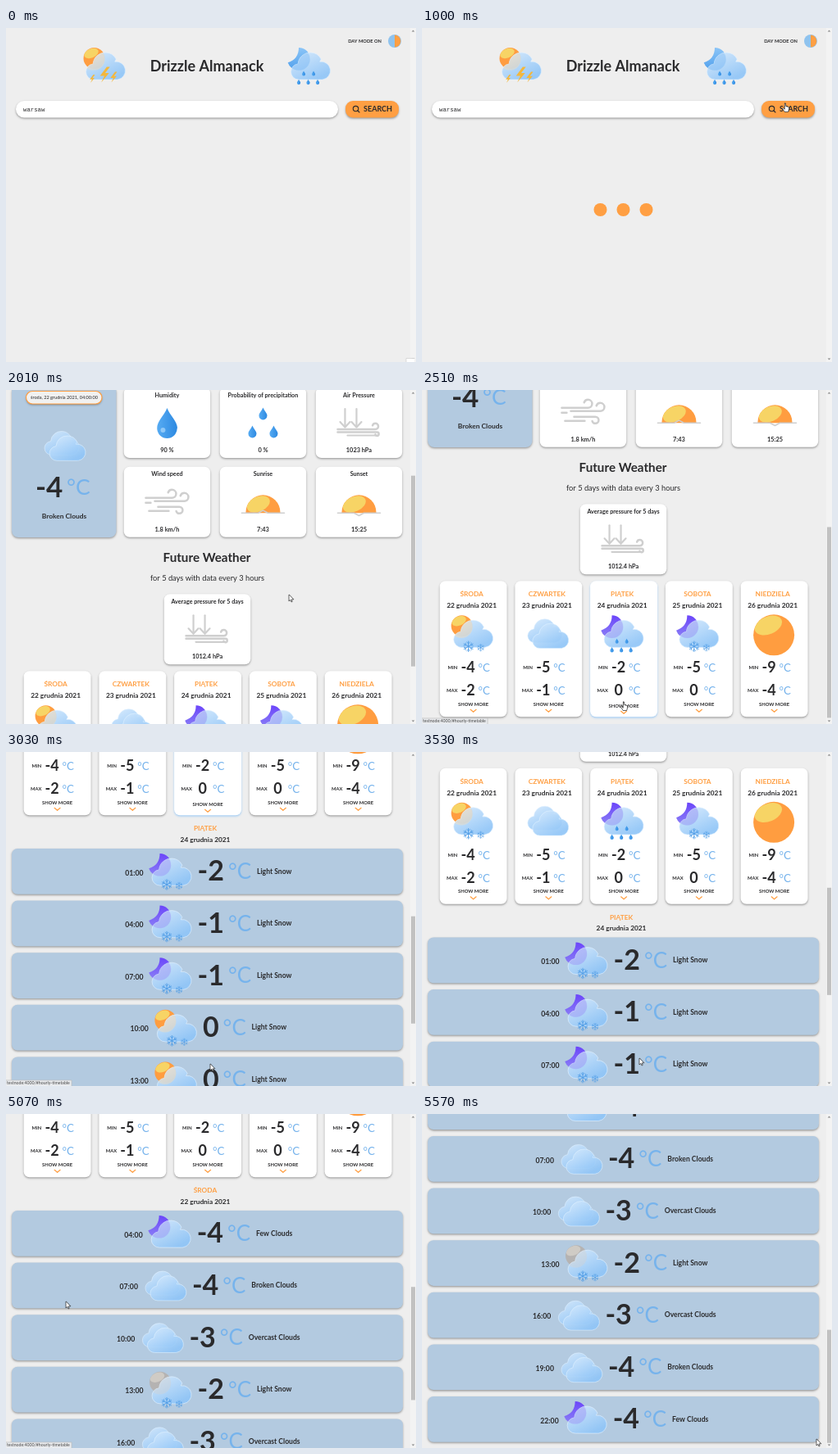
Recreate the animation shown at these times as an HTML page with a canvas. Size 500x408 px, loop 6.08 s.

```html
<!DOCTYPE html>
<html lang="en">
<head>
<meta charset="utf-8">
<title>Drizzle Almanack</title>
<style>
  html, body { margin: 0; width: 100%; height: 100%; overflow: hidden; background: #eee; }
  canvas { display: block; width: 500px; height: 408px; }
</style>
</head>
<body>
<canvas id="stage"></canvas>
<script>
const W = 500, H = 408, LOOP = 6080;
const INK = '#2a2a2c', ORANGE = '#ff9f43', BLUE = '#76b3ec', PANEL = '#b3cae0', GREY = '#cfcfcf';
const SANS = 'Lato, "Open Sans", sans-serif', MONO = '"Liberation Mono", monospace';
const ROWS_TOP = 721, ROW_STEP = 63.6;

const canvas = document.getElementById('stage');
const c = canvas.getContext('2d');
const dpr = window.devicePixelRatio || 1;
canvas.width = W * dpr;
canvas.height = H * dpr;

const days = [
  ['ŚRODA', 22, 'sun snow', -4, -2],
  ['CZWARTEK', 23, 'cloud', -5, -1],
  ['PIĄTEK', 24, 'moon rain', -2, 0],
  ['SOBOTA', 25, 'moon snow', -5, 0],
  ['NIEDZIELA', 26, 'clear', -9, -4]
];

const hours = {
  0: [
    ['04:00', -4, 'Few Clouds', 'moon'],
    ['07:00', -4, 'Broken Clouds', 'cloud'],
    ['10:00', -3, 'Overcast Clouds', 'cloud'],
    ['13:00', -2, 'Light Snow', 'dim snow'],
    ['16:00', -3, 'Overcast Clouds', 'cloud'],
    ['19:00', -4, 'Broken Clouds', 'cloud'],
    ['22:00', -4, 'Few Clouds', 'moon']
  ],
  2: [-2, -1, -1, 0, 0, -1, -1, -2].map((deg, i) => [
    String(1 + 3 * i).padStart(2, '0') + ':00', deg, 'Light Snow',
    (i > 2 && i < 5 ? 'sun' : 'moon') + ' snow'
  ])
};

const scenes = [
  { at: 0, corner: true },
  { at: 500, hand: [442, 92] },
  { at: 1000, hand: [442, 92], dots: true },
  { at: 1510, loaded: true, hand: [442, 92] },
  { at: 2010, loaded: true, scroll: 171, arrow: [345, 250] },
  { at: 2510, loaded: true, scroll: 281, hand: [245, 381], hover: 2, status: 1 },
  { at: 3030, loaded: true, scroll: 603, day: 2, arrow: [249, 381], hover: 2, status: 1 },
  { at: 3530, loaded: true, scroll: 494.5, day: 2, arrow: [265, 374] },
  { at: 4060, loaded: true, scroll: 437.5, day: 2, arrow: [265, 374] },
  { at: 4560, loaded: true, scroll: 437.5, day: 2, hand: [73.3, 229.5], click: true, hover: 0, status: .4 },
  { at: 5070, loaded: true, scroll: 603, day: 0, arrow: [73, 229], status: 1 },
  { at: 5570, loaded: true, scroll: 757.6, day: 0, arrow: [481, 397] }
];

function text(s, x, y, size, { color = INK, weight = 700, align = 'center', font = SANS } = {}) {
  c.font = `${weight} ${size}px ${font}`;
  c.fillStyle = color;
  c.textAlign = align;
  c.fillText(s, x, y);
}

function textWidth(s, size) {
  c.font = `700 ${size}px ${SANS}`;
  return c.measureText(s).width;
}

function box(x, y, w, h, r, fill, shadow = 'rgba(0,0,0,.36)') {
  c.save();
  c.shadowColor = shadow;
  c.shadowBlur = 2.5 * dpr;
  c.shadowOffsetY = 1.3 * dpr;
  c.beginPath();
  c.roundRect(x, y, w, h, r);
  c.fillStyle = fill;
  c.fill();
  c.restore();
}

function disc(x, y, r, fill) {
  c.beginPath();
  c.arc(x, y, r, 0, 7);
  c.fillStyle = fill;
  c.fill();
}

function line(points, color, width) {
  c.beginPath();
  points.forEach(([x, y]) => c.lineTo(x, y));
  c.strokeStyle = color;
  c.lineWidth = width;
  c.lineCap = c.lineJoin = 'round';
  c.stroke();
}

function blend(x0, y0, x1, y1, from, to) {
  const g = c.createLinearGradient(x0, y0, x1, y1);
  g.addColorStop(0, from);
  g.addColorStop(1, to);
  return g;
}

function at(x, y, k, draw) {
  c.save();
  c.translate(x, y);
  c.scale(k, k);
  draw();
  c.restore();
}

function sun(x, y, r, main = '#ff9d40', light = '#f7d465') {
  c.save();
  disc(x, y, r, main);
  c.clip();
  c.beginPath();
  c.ellipse(x - r * .27, y - r * .47, r * .7, r * .43, -.4, 0, 7);
  c.fillStyle = light;
  c.fill();
  c.restore();
}

function moon(x, y, r, from, to) {
  c.beginPath();
  c.arc(x, y, r, -Math.PI / 2, Math.PI * .9);
  c.quadraticCurveTo(x, y, x, y - r);
  c.fillStyle = blend(x, y - r, x, y + r, from, to);
  c.fill();
}

// Glassy cloud; glow tints the part lying over the sun or moon
function cloud(x, y, w, glow) {
  at(x, y, w, () => {
    c.beginPath();
    c.arc(.2, .5, .2, Math.PI / 2, Math.PI * 1.45);
    c.arc(.49, .32, .31, Math.PI * 1.02, Math.PI * 1.85);
    c.arc(.77, .47, .23, Math.PI * 1.45, Math.PI / 2);
    c.closePath();
    c.globalAlpha = .92;
    c.fillStyle = blend(.25, 0, .6, .7, '#cfe6fc', '#90c5f7');
    c.fill();
    c.strokeStyle = 'rgba(225,241,255,.8)';
    c.lineWidth = .018;
    c.stroke();
    if (!glow) return;
    c.clip();
    c.globalAlpha = .38;
    disc(.2, .18, .28, glow);
  });
}

function drop(x, y, h) {
  at(x, y, h, () => {
    c.beginPath();
    c.moveTo(0, -.5);
    c.bezierCurveTo(.1, -.25, .34, -.05, .34, .17);
    c.arc(0, .17, .33, 0, Math.PI);
    c.bezierCurveTo(-.34, -.05, -.1, -.25, 0, -.5);
    c.fillStyle = blend(-.3, 0, .3, 0, '#55aaf2', '#2f8be2');
    c.fill();
  });
}

function flake(x, y, r) {
  for (let i = 0; i < 6; i++) {
    const a = i * Math.PI / 3 + Math.PI / 6;
    const p = (d, off) => [x + Math.cos(a + off) * d, y + Math.sin(a + off) * d];
    line([[x, y], p(r, 0)], '#509de6', r * .15);
    line([p(r * .9, .35), p(r * .55, 0), p(r * .9, -.35)], '#509de6', r * .13);
  }
}

function bolt(x, y, h) {
  at(x, y, h, () => {
    c.beginPath();
    [[.15, -.5], [-.28, .08], [0, .08], [-.2, .5], [.3, -.1], [.05, -.1], [.35, -.5]].forEach(p => c.lineTo(...p));
    c.fillStyle = '#f4b73c';
    c.fill();
  });
}

// Weather icon in a 54 x 46 cell
function icon(kind, x, y) {
  const has = k => kind.includes(k);
  at(x, y, 1, () => {
    if (kind === 'clear') return sun(28, 24, 25);
    if (kind === 'cloud') {
      cloud(3, 4, 42);
      cloud(9, 9.5, 44);
      return;
    }
    let glow;
    if (has('sun')) {
      sun(14.5, 13, 13);
      glow = '#ffdcae';
    }
    if (has('dim')) {
      sun(14.5, 13, 13, '#b5b3b2', '#cfcbc5');
      glow = '#d5d2d0';
    }
    if (has('moon')) {
      moon(14, 14, 14, '#6b45fa', '#8c82f5');
      glow = '#9a8df2';
    }
    if (has('dusk')) {
      moon(14, 14, 14, '#8cc5f7', '#4f9fec');
      glow = '#7db8f2';
    }
    cloud(4.5, 5.5, 48, glow);
    if (has('snow')) {
      flake(22.5, 38, 6.3);
      flake(37.5, 39.5, 4.2);
    }
    if (has('rain')) {
      for (let i = 0; i < 3; i++) {
        drop(14 + 11.5 * i, 42, 6.5);
        if (i < 2) drop(20 + 12 * i, 31.5, 6);
      }
    }
    if (has('bolt')) {
      bolt(27, 33, 19);
      bolt(12, 38, 10);
      bolt(38, 36, 13);
    }
  });
}

function hook(x0, x1, y, r, up) {
  c.beginPath();
  c.moveTo(x0, y);
  c.lineTo(x1, y);
  if (up) c.arc(x1, y - r, r, Math.PI / 2, -Math.PI * .9, true);
  else c.arc(x1, y + r, r, -Math.PI / 2, Math.PI * .9);
  c.strokeStyle = GREY;
  c.lineWidth = 2.5;
  c.lineCap = 'round';
  c.stroke();
}

const art = {
  humidity(x, y) {
    drop(x, y + 43.5, 37);
    disc(x - 5, y + 52, 3, 'rgba(190,226,255,.6)');
  },
  rain(x, y) {
    drop(x, y + 32, 15);
    drop(x - 13, y + 54, 15);
    drop(x + 13, y + 54, 15);
  },
  pressure(x, y) {
    for (const dx of [-17, -3]) {
      line([[x + dx, y + 26], [x + dx, y + 48]], GREY, 2.2);
      line([[x + dx - 6, y + 42], [x + dx, y + 48.5], [x + dx + 6, y + 42]], GREY, 2.2);
    }
    hook(x - 26, x + 20, y + 51, 3.6, true);
    hook(x - 26, x + 22, y + 54.5, 2.2, false);
    line([[x - 14, y + 58.5], [x + 22, y + 58.5]], GREY, 2.2);
  },
  wind(x, y) {
    hook(x - 26, x + 6, y + 38, 5, true);
    hook(x - 15, x + 21, y + 42, 5, true);
    line([[x - 26, y + 44], [x - 20, y + 44]], GREY, 2.5);
    hook(x - 11, x + 15, y + 49, 4, false);
    line([[x - 22, y + 54], [x + 2, y + 54]], GREY, 2.5);
  },
  horizon(x, y, dir) {
    const h = y + 56.5;
    c.save();
    c.beginPath();
    c.rect(x - 30, y + 20, 60, 36.5);
    c.clip();
    sun(x, h - 1, 21);
    c.restore();
    line([[x - 26, h], [x - 6, h], [x, h + dir * 3.2], [x + 6, h], [x + 26, h]], GREY, 1.6);
  }
};

function stat(x, y, label, value, draw, dir) {
  const w = 105.5, mid = x + w / 2;
  box(x, y, w, 86, 7, '#fff');
  text(label, mid, y + 11.5, 7.2);
  draw(mid, y, dir);
  text(value, mid, y + 79, 7.4);
}

function header() {
  icon('sun bolt', 93, 24);
  icon('dusk rain', 343, 24);
  text('Drizzle Almanack', 245, 53, 18);
  text('DAY MODE ON', 437.5, 18, 5.7);
  disc(474, 16, 8, '#8fc3ee');
  c.beginPath();
  c.arc(474, 16, 7.4, -Math.PI / 2, Math.PI / 2);
  c.fillStyle = ORANGE;
  c.fill();
}

function searchBar(s) {
  box(12, 89, 393, 20.5, 10, '#fff');
  const opts = { weight: 400, align: 'left', font: MONO };
  if (s.loaded) text('Type your city…', 21, 101.5, 7.4, { ...opts, color: '#777' });
  else text('warsaw', 21, 101.5, 7.3, opts);
  box(414, 89, 65, 20.5, 9, ORANGE);
  c.beginPath();
  c.arc(426.5, 98.6, 3.2, 0, 7);
  c.strokeStyle = INK;
  c.lineWidth = 1.1;
  c.stroke();
  line([[428.9, 101], [431, 103]], INK, 1.1);
  text('SEARCH', 453.5, 102.3, 9);
}

function current() {
  const lead = 'Current weather for ', lw = textWidth(lead, 15);
  const x = 245.5 - (lw + textWidth('Warsaw', 15)) / 2;
  text(lead, x, 143.5, 15, { align: 'left' });
  text('Warsaw', x + lw, 143.5, 15, { align: 'left', color: ORANGE });

  box(7, 165, 127.5, 186, 8, PANEL);
  box(24.5, 172.5, 92.5, 15.5, 7.7, '#f1f1f1');
  c.strokeStyle = ORANGE;
  c.lineWidth = 1.2;
  c.stroke();
  text('środa, 22 grudnia 2021, 04:00:00', 71, 182.3, 5.6, { weight: 400 });
  icon('cloud', 44, 217);
  text('-4', 36, 301.5, 35, { align: 'left' });
  text('°C', 74, 298.5, 26.5, { align: 'left', weight: 400, color: BLUE });
  text('Broken Clouds', 71, 327.5, 8.4);

  stat(143.7, 168, 'Humidity', '90 %', art.humidity);
  stat(260.7, 168, 'Probability of precipitation', '0 %', art.rain);
  stat(377.7, 168, 'Air Pressure', '1023 hPa', art.pressure);
  stat(143.7, 264.8, 'Wind speed', '1.8 km/h', art.wind);
  stat(260.7, 264.8, 'Sunrise', '7:43', art.horizon, -1);
  stat(377.7, 264.8, 'Sunset', '15:25', art.horizon, 1);
}

function dayCard([name, date, kind, min, max], i, hover) {
  const x = 21.6 + 91.75 * i, y = 514.3;
  box(x, y, 82, 166, 7, '#fff', hover ? '#9cc9f3' : undefined);
  text(name, x + 39, y + 19, 8.3, { color: ORANGE });
  text(date + ' grudnia 2021', x + 39, y + 33, 8.3);
  icon(kind, x + 12.5, y + 42);
  [['MIN', min], ['MAX', max]].forEach(([label, deg], k) => {
    const base = y + 111.7 + 28 * k;
    text(label, x + 10 - 1.5 * k, base - 4, 5.8, { align: 'left' });
    text(deg, x + 34.5, base, 18);
    text('°C', x + 47, base - 1, 13.3, { align: 'left', weight: 400, color: BLUE });
  });
  const dy = hover ? 2 : 0, mid = x + 41;
  text('SHOW MORE', mid, y + 152.5 + dy, 5.8);
  line([[mid - 3.5, y + 157 + dy], [mid, y + 160 + dy], [mid + 3.5, y + 157 + dy]], ORANGE, 1.2);
}

function hourRow([time, deg, desc, kind], i) {
  const y = ROWS_TOP + ROW_STEP * i;
  box(7, y, 477, 55.7, 7, PANEL);
  const tw = textWidth(time, 8.7), dw = textWidth(deg, 34);
  const left = { align: 'left' };
  let x = 246.8 - (tw + dw + textWidth(desc, 8.6) + 106) / 2;
  text(time, x, y + 32.5, 8.7, left);
  icon(kind, x + tw + 6, y + 6);
  x += tw + 66;
  text(deg, x, y + 39.3, 34, left);
  x += dw + 5;
  text('°C', x, y + 37, 26, { ...left, weight: 400, color: BLUE });
  text(desc, x + 35, y + 30.5, 8.6, left);
}

function page(s) {
  header();
  searchBar(s);
  if (s.dots) [-1, 0, 1].forEach(i => disc(245.5 + 28 * i, 222, 8, ORANGE));
  if (!s.loaded) return;
  current();
  text('Future Weather', 245, 380.5, 15.2);
  text('for 5 days with data every 3 hours', 245.5, 404.3, 9.3, { weight: 400 });
  stat(192.8, 420.3, 'Average pressure for 5 days', '1012.4 hPa', art.pressure);
  days.forEach((d, i) => dayCard(d, i, s.hover === i));
  if (s.day === undefined) return;
  const [name, date] = days[s.day];
  text(name, 243, 699, 8.3, { color: ORANGE });
  text(date + ' grudnia 2021', 243, 712.8, 8.3);
  hours[s.day].forEach(hourRow);
}

function scrollbar(s) {
  c.fillStyle = '#f3f3f3';
  c.fillRect(493, 0, 7, H);
  for (const [y, d] of [[4.5, -1], [403.5, 1]]) {
    c.beginPath();
    [[-1.8, 0], [1.8, 0], [0, 2 * d]].forEach(([dx, dy]) => c.lineTo(496.5 + dx, y + dy));
    c.fillStyle = '#8a8a8a';
    c.fill();
  }
  if (!s.loaded) return;
  const n = s.day === undefined ? 0 : hours[s.day].length;
  const k = 394 / (n ? ROWS_TOP - 3 + ROW_STEP * n : 690);
  c.fillStyle = '#c1c1c1';
  c.fillRect(494, 7 + (s.scroll || 0) * k, 5, H * k);
}

function pointer(points, x, y) {
  c.beginPath();
  points.forEach(([dx, dy]) => c.lineTo(x + dx, y + dy));
  c.closePath();
  c.fillStyle = '#fff';
  c.fill();
  c.strokeStyle = '#222';
  c.lineWidth = .7;
  c.lineJoin = 'round';
  c.stroke();
}

const ARROW = [[0, 0], [0, 8], [1.8, 6.4], [3, 9], [4.2, 8.4], [3.1, 5.9], [5.5, 5.8]];
const HAND = [[0, 0], [1.5, 0], [1.8, 3.6], [5.6, 4.6], [5.4, 8], [4.6, 10.5], [.2, 10.5], [-2.4, 6.4], [-1.6, 5.6], [0, 7]];

function overlay(s) {
  scrollbar(s);
  if (s.corner) {
    c.fillStyle = '#fff';
    c.fillRect(488, 403.5, 10, 5);
    line([[498, 403.5], [488, 403.5], [488, H]], '#ccc', .7);
  }
  if (s.status) {
    c.globalAlpha = s.status;
    c.fillStyle = '#e9ebee';
    c.fillRect(0, 401, 80, 7);
    line([[0, 401], [80, 401], [80, H]], '#bbb', .7);
    text('testnode:4000/#hourly-timetable', 1, 406.3, 5.2, { align: 'left', weight: 400, color: '#444' });
    c.globalAlpha = 1;
  }
  if (s.arrow) pointer(ARROW, ...s.arrow);
  if (s.hand) pointer(HAND, ...s.hand);
  if (s.click) disc(73, 230, 4.6, 'rgba(232,208,60,.75)');
}

function draw(s) {
  c.setTransform(dpr, 0, 0, dpr, 0, 0);
  c.fillStyle = '#eee';
  c.fillRect(0, 0, W, H);
  c.save();
  c.translate(0, -(s.scroll || 0));
  page(s);
  c.restore();
  overlay(s);
}

const start = performance.now();
let shown;

function tick() {
  const t = (performance.now() - start) % LOOP;
  const s = scenes.findLast(k => k.at <= t);
  if (s !== shown) draw(shown = s);
  requestAnimationFrame(tick);
}
tick();
</script>
</body>
</html>
```
